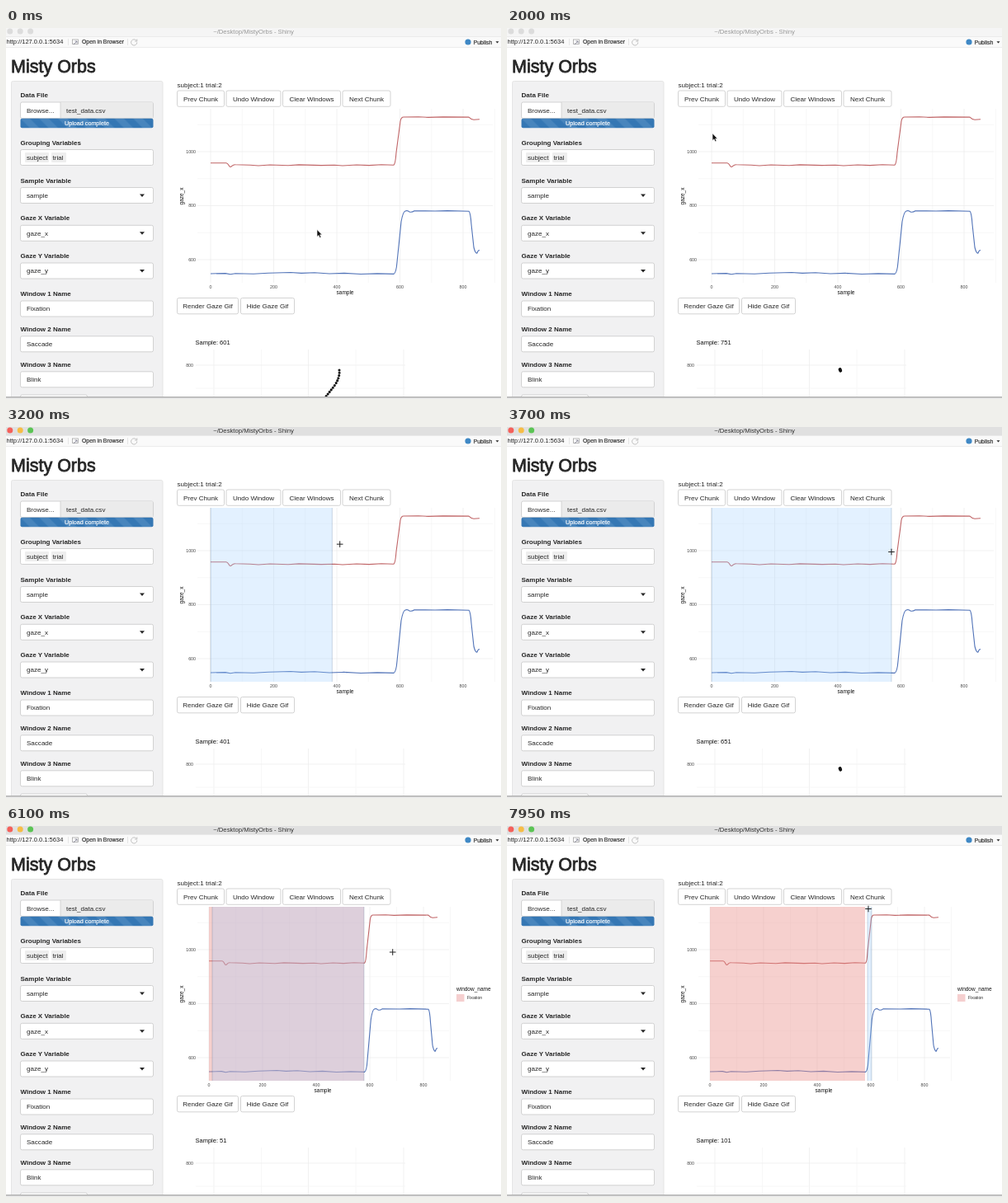
An HTML page for the animation above (8 s loop, 600 px wide and 450 px high).

```html
<!DOCTYPE html>
<html lang="en">
<head>
<meta charset="utf-8">
<title>Gaze window editor</title>
<style>
html, body { margin: 0; width: 100%; height: 100%; overflow: hidden; background: #fff; }
svg { display: block; width: 600px; height: 450px; font-family: "Liberation Sans", Arial, sans-serif; font-size: 8.05px; fill: #262626; }
.label { font-weight: bold; font-size: 8px; }
.box { fill: #fff; stroke: #c8c8c8; stroke-width: .8; }
.mid { text-anchor: middle; }
.end { text-anchor: end; }
.tick { font-size: 5.3px; fill: #444; }
.axis { font-size: 6.5px; fill: #111; }
.grid path { fill: none; stroke: #ebebeb; stroke-width: .7; }
.grid .minor { stroke: #f4f4f4; }
.trace { fill: none; stroke-width: 1.1; stroke-linejoin: round; vector-effect: non-scaling-stroke; }
#brush { fill: #9cf; fill-opacity: .27; }
#edges { fill: none; stroke: #036; stroke-opacity: .22; stroke-width: .8; }
</style>
</head>
<body>
<svg id="stage" viewBox="0 0 600 450"></svg>
<script>
const LOOP = 8000, ACTIVATE = 2050, REDRAW = 5700, PRESS = 7600;

const text = (x, y, s, cls = '', extra = '') => `<text x="${x}" y="${y}" class="${cls}" ${extra}>${s}</text>`;
const rect = (x, y, w, h, extra) => `<rect x="${x}" y="${y}" width="${w}" height="${h}" ${extra}/>`;
const box = (x, y, w, h) => rect(x, y, w, h, 'rx="2" class="box"');
const button = (x, y, w, s) => box(x, y, w, 19.3) + text(x + w / 2, y + 12.5, s, 'mid');
const label = (y, s) => text(17.5, y + 3, s, 'label');
const field = (y, s) => box(17.5, y - 9.5, 161, 19) + text(25, y + 2.8, s);
const select = (y, s) => field(y, s) + `<path d="M162 ${y - 1.5}h6l-3 3.5z"/>`;
const line = (x1, y1, x2, y2, cls = '') => `<path class="${cls}" d="M${x1} ${y1}L${x2} ${y2}"/>`;

function windowChrome() {
  return rect(0, 0, 600, 10.5, 'id="bar"') +
    [4.8, 17.2, 29.6].map(x => `<circle class="light" cx="${x}" cy="4" r="3.5"/>`).join('') +
    text(300, 7.2, '~/Desktop/MistyOrbs - Shiny', 'mid', 'id="caption" font-size="7.7"') +
    rect(0, 10.5, 600, 13, 'fill="#fafafa"') +
    '<path d="M0 10.5H600M0 23.5H600" stroke="#e3e3e3" stroke-width=".6"/>' +
    text(.5, 19.3, 'http://127.0.0.1:5634', '', 'font-size="7.5"') +
    '<path d="M75.5 13v8M147.5 13v8" stroke="#ddd" stroke-width=".7"/>' +
    rect(80.5, 14, 7, 5.5, 'fill="#fff" stroke="#999" stroke-width=".7"') +
    '<path d="M82 20l4-4M83.5 16H86v2.5" fill="none" stroke="#778" stroke-width=".8"/>' +
    text(92, 19.3, 'Open in Browser', '', 'font-size="6.85" stroke="#262626" stroke-width=".15"') +
    '<path d="M158 15.2a3.6 3.6 0 1 0 .8 2.2M158.8 13.5v2.6h-2.6" fill="none" stroke="#bbb" stroke-width=".9"/>' +
    '<circle cx="560" cy="17" r="3.6" fill="#3f88c5"/>' +
    text(566.5, 19.5, 'Publish', '', 'font-size="7" stroke="#262626" stroke-width=".15"') +
    '<path d="M593.5 16.2h4l-2 2.4z"/>';
}

function sidebar() {
  return rect(6.5, 64.5, 183.5, 390, 'rx="2" fill="#f1f1f2" stroke="#e0e0e0" stroke-width=".8"') +
    label(81, 'Data File') +
    box(17.5, 90, 161, 19.5) + rect(66, 90.4, 112, 18.7, 'fill="#ebebeb"') +
    '<path d="M66 90v19" stroke="#ccc" stroke-width=".8"/>' +
    text(25, 102.7, 'Browse...') + text(73, 102.7, 'test_data.csv') +
    rect(17.5, 109.8, 161, 11.5, 'rx="2" fill="url(#stripes)"') +
    text(98, 118, 'Upload complete', 'mid', 'font-size="7.2" style="fill:#fff" stroke="#fff" stroke-width=".2"') +
    label(139, 'Grouping Variables') + field(157, '') +
    rect(23, 151, 29, 12, 'rx="1" fill="#eee"') + rect(55, 151, 18, 12, 'rx="1" fill="#eee"') +
    text(25, 159.8, 'subject') + text(56.5, 159.8, 'trial') +
    label(184.5, 'Sample Variable') + select(203, 'sample') +
    label(230, 'Gaze X Variable') + select(248.8, 'gaze_x') +
    label(276, 'Gaze Y Variable') + select(294.5, 'gaze_y') +
    label(322, 'Window 1 Name') + field(340.5, 'Fixation') +
    label(365, 'Window 2 Name') + field(383.3, 'Saccade') +
    label(408, 'Window 3 Name') + field(426.3, 'Blink') +
    box(17.5, 445, 81, 10);
}

// The panel narrows once a legend takes room on the right.
function plot(id, x0, step, right, center) {
  const xs = [0, 1, 2, 3, 4].map(i => x0 + i * step);
  const scale = step / 76.5;
  return `<g id="${id}"><g class="grid">` +
    [117.3, 182.8, 248.3].map(y => line(232, y, right, y, 'minor')).join('') +
    xs.map(x => line(x + step / 2, 98, x + step / 2, 309, 'minor')).join('') +
    [150, 215.5, 281].map(y => line(232, y, right, y)).join('') +
    xs.map(x => line(x, 98, x, 309)).join('') + '</g>' +
    xs.map((x, i) => text(x, 315.8, i * 200, 'tick mid')).join('') +
    text(center, 323, 'sample', 'axis mid') +
    `<g transform="translate(${x0 - 248 * scale}) scale(${scale} 1)">
      <path class="trace" stroke="#c06466" d="M248 163.7H267C270 164 270 168.7 272 168.5S274 165.5 278 165.7L296 166.2L306 167L320 166L342 166.7L355 165.9L382 166.6L398 166.2L408 167L425 166L440 166.6L455 165.8L470 166.2Q472 165 473 151L478 113Q479 108 482 108L500 107.8L512 108.4L530 107.9L561 108.1Q564 111.2 567 111.2L574 110.7"/>
      <path class="trace" stroke="#5173b8" d="M248 298L266 297.6L272 298.7L278 297.8L300 298.2L318 297.3L345 296.5L358 297.4L374 296.8L392 298L410 297.4L430 298.5L450 297.9L470 298.4Q473 297 474 284L479 235Q481 223 484 222Q487 221 489 223Q492 224 495 221.8L520 222L535 221.6L561 222.2Q563 224 564 238L567 266Q569 274 571 273Q572 269.5 574 269.5"/>
    </g></g>`;
}

function gazeClip() {
  return '<g class="grid">' +
    [252, 309.5, 366.5, 424, 482].map((x, i) => line(x, 390, x, 447, i % 2 ? 'minor' : '')).join('') +
    line(230, 409, 484, 409) + line(230, 437, 484, 437, 'minor') + '</g>' +
    text(227, 410.8, '800', 'tick end') +
    text(229.5, 384, '', '', 'id="counter" font-size="7.5" style="fill:#111"') +
    `<path id="trail" d="M404 415Q405 424 398 434L387 448" fill="none" stroke="#111"
      stroke-width="3.1" stroke-linecap="round" stroke-dasharray="0 3.3"/>
    <path id="cluster" d="M403.6 414L404.2 415.6" stroke="#111" stroke-width="4" stroke-linecap="round"/>`;
}

const stage = document.getElementById('stage');
stage.innerHTML = `<defs><pattern id="stripes" width="22.8" height="22.8" patternUnits="userSpaceOnUse" patternTransform="translate(17.5 109.8)">
    <path d="M0 0h22.8v22.8H0z" fill="#3577b4"/><path d="M0 0h11.4l11.4 11.4v11.4zM0 11.4l11.4 11.4H0z" fill="#4885bd"/></pattern></defs>` +
  rect(0, 0, 600, 450, 'fill="#fff"') + windowChrome() +
  text(6, 54, 'Misty Orbs', '', 'font-size="21.5" stroke="#262626" stroke-width=".8"') +
  sidebar() +
  text(207.5, 72.4, 'subject:1 trial:2') +
  button(207.5, 76, 57, 'Prev Chunk') + button(267, 76, 66, 'Undo Window') +
  button(335.5, 76, 70, 'Clear Windows') + button(408, 76, 58, 'Next Chunk') +
  [1000, 800, 600].map((v, i) => text(230, 151.8 + i * 65.5, v, 'tick end')).join('') +
  text(0, 0, 'gaze_x', 'axis mid', 'transform="translate(215 204) rotate(-90)"') +
  plot('widePlot', 248, 76.5, 590, 411) + plot('narrowPlot', 246, 65, 537, 384) +
  '<g id="result">' + rect(246, 98, 188, 211, 'fill="#e98986" fill-opacity=".4"') +
  text(546, 199.5, 'window_name', 'axis') + rect(546, 204, 9.5, 9, 'fill="#f5cfcf"') +
  text(559, 210.3, 'Fixation', '', 'font-size="5.2"') + '</g>' +
  rect(0, 98, 0, 211, 'id="brush"') + '<path id="edges"/>' +
  button(207.5, 327.5, 74, 'Render Gaze Gif') + button(284.5, 327.5, 65, 'Hide Gaze Gif') +
  gazeClip() +
  rect(0, 447, 600, 3, 'fill="#ececec"') + rect(0, 447, 600, 1.6, 'fill="#b3b3b3"') +
  `<path id="arrow" d="M0 0V8.7L2 7L3.4 10L5 9.3L3.6 6.4H6.2Z" fill="#111" stroke="#fff" stroke-width=".6"/>
   <path id="cross" d="M-3.8 0H3.8M0 -3.8V3.8" fill="none" stroke="#222" stroke-width="1"/>`;

// [time, value...] steps
const pointer = [[0, 377, 244.5], [250, 372, 238], [900, 256, 132], [1200, 249, 124], [2050, 249, 128], [2250, 250, 128],
  [2650, 292, 128], [3050, 376, 138], [3450, 452, 149], [3700, 466, 151.5], [4400, 468.7, 153],
  [6900, 468.7, 153], [7250, 442, 100.5], [7600, 442, 100.5], [7850, 438, 100.5], [8000, 438, 100.5]];
const brushEdge = [[2250, 248], [2350, 249], [2650, 285], [3050, 364], [3450, 447], [3700, 466], [4400, 469]];
const clipStep = [[0, 12], [1200, 24], [2000, 32], [2150, 32], [2650, 37], [3700, 47], [5400, 64],
  [5700, 67], [5900, 67], [7300, 81], [7950, 87]];

function at(track, t) {
  if (t <= track[0][0]) return track[0].slice(1);
  const i = track.findIndex(k => k[0] > t);
  if (i < 0) return track.at(-1).slice(1);
  const a = track[i - 1], b = track[i], p = (t - a[0]) / (b[0] - a[0]);
  return a.slice(1).map((v, n) => v + (b[n + 1] - v) * p);
}

const part = Object.fromEntries([...stage.querySelectorAll('[id]')].map(e => [e.id, e]));
const lights = [...stage.querySelectorAll('.light')];
const show = (name, on) => part[name].style.display = on ? '' : 'none';

function brushRange(t, x) {
  if (t >= PRESS) return [x - 1, 442];
  return t < REDRAW ? [248, at(brushEdge, t)[0]] : [250, 434];
}

function drawBrush(t, x) {
  const [left, right] = brushRange(t, x);
  const on = t > 2250 && right - left > .5;
  show('brush', on);
  show('edges', on);
  part.brush.setAttribute('x', left);
  part.brush.setAttribute('width', Math.max(0, right - left));
  part.edges.setAttribute('d', `M${left} 98V309M${right} 98V309`);
}

function draw(t) {
  const active = t >= ACTIVATE, redrawn = t >= REDRAW;
  part.bar.style.fill = active ? '#e0e0e0' : '#f5f5f5';
  part.caption.style.fill = active ? '#333' : '#999';
  lights.forEach((l, i) => l.style.fill = active ? ['#f4605a', '#f7bd45', '#5bc454'][i] : '#dcdcdc');

  show('widePlot', !redrawn);
  show('narrowPlot', redrawn);
  show('result', redrawn);

  const [x, y] = at(pointer, t);
  for (const name of ['arrow', 'cross']) {
    show(name, (name === 'cross') === active);
    part[name].setAttribute('transform', `translate(${x} ${y})`);
  }
  drawBrush(t, x);

  const sample = Math.round(at(clipStep, t)[0]) % 17 * 50 + 1;
  part.counter.textContent = 'Sample: ' + sample;
  show('trail', sample === 601);
  show('cluster', sample > 601);
}

function tick() {
  draw(performance.now() % LOOP);
  requestAnimationFrame(tick);
}
tick();
</script>
</body>
</html>
```
